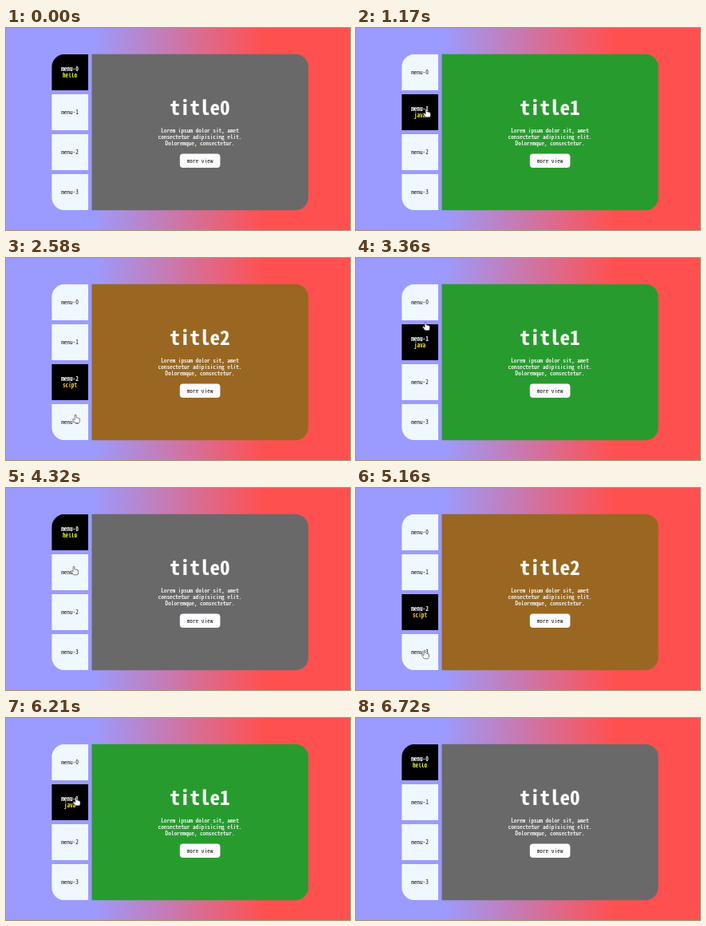
Write an HTML page that moves like this. It is 431 px wide and 253 px high and loops after 7.53 s.

```html
<!DOCTYPE html>
<html lang="en">
<head>
<meta charset="utf-8">
<title>Hover menu</title>
<style>
  html, body { margin: 0; width: 100%; height: 100%; overflow: hidden; }
  body { background: linear-gradient(90deg, #9b9bff 25%, #ff5050 75%); }
  svg { display: block; width: 431px; height: 253px; }
  text {
    font: 7.25px "Noto Sans Mono CJK KR", "Noto Sans Mono CJK JP", "Noto Sans Mono", monospace;
    font-size-adjust: ch-width 0.5;
    text-anchor: middle;
    fill: #111;
  }
  .light { fill: #fff; stroke: #fff; stroke-width: .2px; }
  .title { font-size: 25px; font-weight: 700; }
  .item rect { fill: #f0f8ff; }
  .item .sub { display: none; }
  .item.on rect { fill: #000; }
  .item.on text { fill: #fff; font-weight: 700; transform: translateY(-4.5px); }
  .item.on .sub { display: block; fill: var(--tint); }
</style>
</head>
<body>
<svg viewBox="0 0 431 253">
  <clipPath id="card"><rect x="57.4" y="32.8" width="321.3" height="195.4" rx="16"/></clipPath>
  <g clip-path="url(#card)">
    <rect id="panel" x="107.5" y="32" width="272" height="197"/>
    <g id="menu"></g>
  </g>
  <text id="title" class="light title" x="243" y="108.7"></text>
  <text class="light" x="243" y="130.5">Lorem ipsum dolor sit, amet</text>
  <text class="light" x="243" y="138.7">consectetur adipisicing elit.</text>
  <text class="light" x="243" y="146.9">Doloremque, consectetur.</text>
  <rect x="217.8" y="157.5" width="50.6" height="17.6" rx="4" fill="#fdfbff"/>
  <text x="243" y="169">more view</text>
  <g id="cursor" fill="#fff" stroke="#333" stroke-width=".7" stroke-linejoin="round">
    <path d="M-1 .8Q0-.6 1 .8V4.3Q2.2 3.6 2.8 4.8Q4 4.2 4.5 5.4Q6 5 6 6.7V9Q6 10.5 5 12H-.6L-3.7 7.6Q-4.2 6.2-2.8 6.2L-1 7.6z"/>
  </g>
</svg>
<script>
const LOOP = 7530, TICK = 30, LAG = 180;
const TOP = 33, SIZE = 45, PITCH = 50;
const $ = id => document.getElementById(id);

const words = ['hello', 'java', 'scipt', 'world'];
const colors = ['#696969', '#289b2e', '#996721', '#2f5f9e'];

// Pointer stops: [time, x, y]
const stops = [
  [30, 54, 60], [780, 87, 88], [1170, 88, 101], [1710, 88, 134], [2400, 88, 165],
  [2580, 87, 196], [2880, 87, 201], [3360, 87, 80], [3690, 87, 80], [3870, 86, 56],
  [4320, 85, 98], [5040, 86, 176], [5160, 86, 203], [5310, 86, 203], [5550, 92, 170],
  [5700, 92, 170], [6390, 86, 74], [6720, 36, 60]
];

$('menu').innerHTML = words.map((word, i) => {
  const y = TOP + i * PITCH;
  return `<g class="item" style="--tint:hsl(${63 - 8 * i} 90% 58%)">
    <rect x="57" y="${y}" width="46" height="${SIZE}"/>
    <text x="80" y="${y + 25}">menu-${i}</text>
    <text class="sub" x="80" y="${y + 33.2}">${word}</text>
  </g>`;
}).join('');
const items = [...document.querySelectorAll('.item')];

function pointerAt(t) {
  const n = stops.findIndex(s => s[0] > t);
  if (n < 1) return null;
  const [t0, x0, y0] = stops[n - 1], [t1, x1, y1] = stops[n];
  const f = (t - t0) / (t1 - t0);
  return [x0 + (x1 - x0) * f, y0 + (y1 - y0) * f];
}

// The page follows the last item hovered, a little late.
function pageAt(t) {
  for (let s = t - LAG; s > 0; s -= TICK) {
    const tip = pointerAt(s);
    if (!tip) continue;
    const y = tip[1] - TOP;
    if (y % PITCH <= SIZE) return Math.floor(y / PITCH);
  }
  return 0;
}

let shown = -1;
function select(i) {
  if (i === shown) return;
  shown = i;
  items.forEach((el, n) => el.classList.toggle('on', n === i));
  $('panel').setAttribute('fill', colors[i]);
  $('title').textContent = 'title' + i;
}

function draw(now) {
  const t = Math.floor(now % LOOP / TICK) * TICK;
  select(pageAt(t));
  const tip = pointerAt(t);
  $('cursor').style.display = tip ? '' : 'none';
  if (tip) $('cursor').setAttribute('transform', `translate(${tip}) scale(.9)`);
}

let start;
function frame(now) {
  start ??= now;
  draw(now - start);
  requestAnimationFrame(frame);
}
draw(0);
requestAnimationFrame(frame);
</script>
</body>
</html>
```
